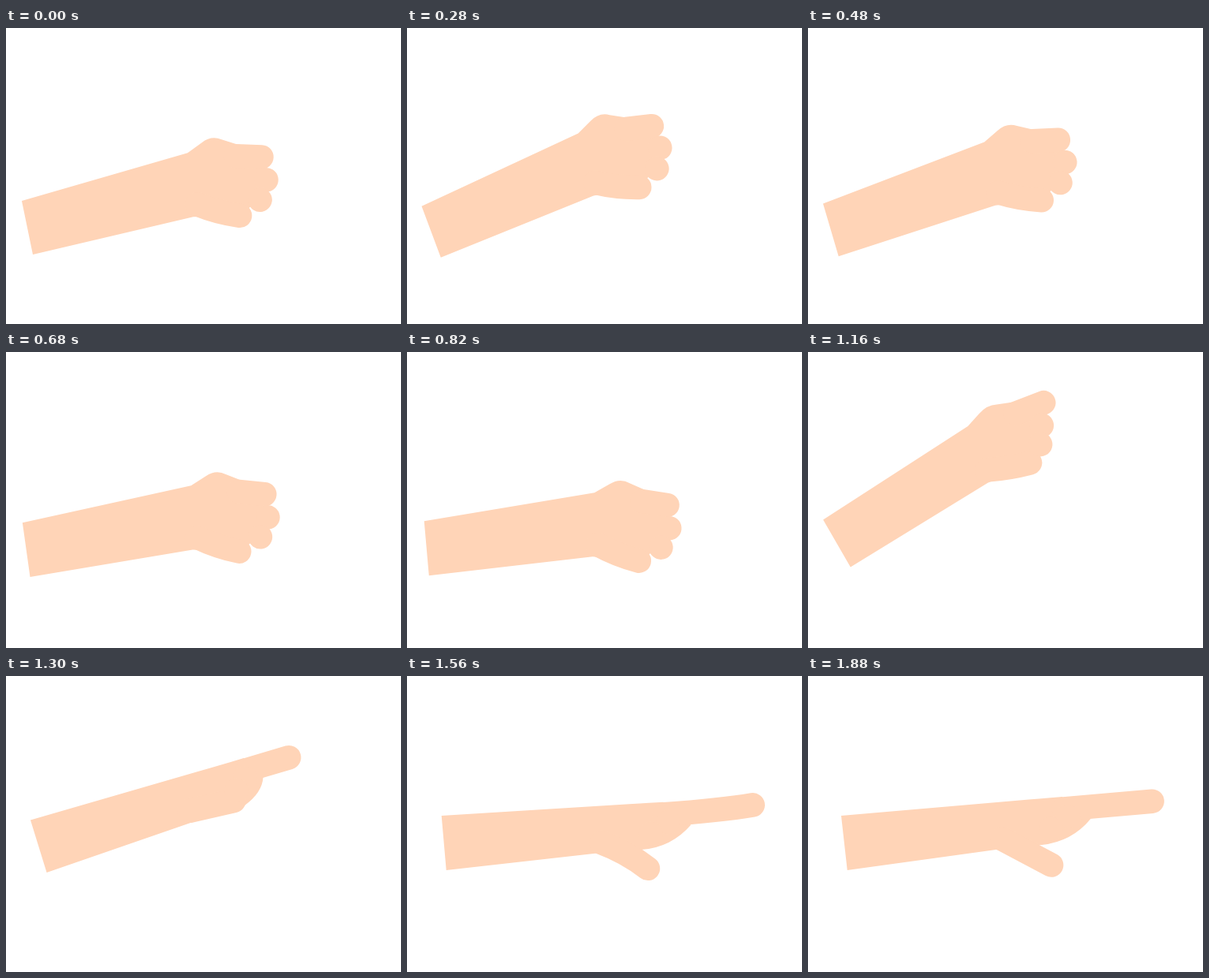
Recreate the animation shown at these times as an HTML page. Size 500 by 375 pixels, loop 8000 ms.

```html
<!DOCTYPE html>
<html lang="en">
<head>
<meta charset="utf-8">
<title>Hand</title>
<style>
  html, body { margin: 0; width: 100%; height: 100%; overflow: hidden; background: #fff; }
  svg { display: block; width: 100vw; height: 100vh; }
  .limb { fill: none; stroke: #ffd4b7; stroke-width: 30.6; stroke-linecap: round; }
</style>
</head>
<body>
<svg viewBox="0 0 500 375">
  <g id="arm">
    <path id="body" fill="#ffd4b7"/>
    <path id="index" class="limb"/>
    <path id="thumb" class="limb"/>
    <path id="middle" class="limb"/>
    <path id="ring" class="limb"/>
  </g>
</svg>
<script>
const LOOP = 8000;
const PIVOT = [39, 21];
const el = id => document.getElementById(id);

// Joint positions in arm space: the elbow's upper corner is the origin.
const fist = {
  wrist: [217.9, -17], bump1: [238.1, -26.2], bumpTop: [251.8, -33], bump2: [263.4, -25], notch: [280.8, -15.3],
  index0: [276.8, -0.9], indexMid: [292.6, 3], index1: [308.4, 6.9],
  palm0: [306.7, 7.8], palmMid: [313.7, 53.2], palm1: [266.6, 74.1], heel: [208.5, 63.7],
  thumb0: [216.6, 49], thumbMid: [239.9, 64.6], thumb1: [266.6, 74.1],
  middle: [308.5, 36.3], ring: [295.6, 59.6]
};
const half = {
  wrist: [218, 3.8], bump1: [238, 4.2], bumpTop: [252, 4.4], bump2: [263, 4.6], notch: [281, 4.9],
  index0: [281, 20.4], indexMid: [308, 20.7], index1: [335.5, 21],
  palm0: [297.4, 35.1], palmMid: [290.4, 53.8], palm1: [264.6, 62.4], heel: [191.8, 63.3],
  thumb0: [196, 48.3], thumbMid: [224, 50.4], thumb1: [253, 52.4],
  middle: [275, 30], ring: [260, 41]
};
const open = {
  wrist: [218, 5.7], bump1: [238, 6.2], bumpTop: [252, 6.5], bump2: [263, 6.8], notch: [281, 7.3],
  index0: [281, 22.9], indexMid: [352, 24.6], index1: [393.2, 25.7],
  palm0: [313.6, 39], palmMid: [286.5, 65.4], palm1: [248.3, 65.1], heel: [190, 64.6],
  thumb0: [198.8, 51.8], thumbMid: [228, 71.8], thumb1: [257.4, 91.8],
  middle: [285, 33], ring: [262, 46]
};
// Follow-through of the open fingers.
const bend = { indexMid: [0, -0.4], index1: [0.5, -4.9], thumbMid: [1, -5.8], thumb1: [-3, -2.4] };

// Tracks of [time, value], eased in and out between keys.
const angle = [[-245, 5], [296, 20.5], [838, 5], [1000, 35], [1030, 35], [1520, 4.5], [1640, 6.4]];
const pivotX = [[960, 62.4], [1040, 59.5], [1510, 85], [1640, 83.1]];
const pivotY = [[1020, 231.7], [1300, 191.1], [1560, 194.4], [1640, 193.5]];
const flex = [[1420, 0], [1550, 1], [1720, -0.15], [1880, 0]];

const clamp = x => Math.min(1, Math.max(0, x));
const mix = (a, b, k) => a + (b - a) * k;

function track(keys, t) {
  let value = keys[0][1];
  for (let i = 1; i < keys.length; i++) {
    const [t0, v0] = keys[i - 1], [t1, v1] = keys[i];
    if (t >= t0) value = mix(v0, v1, 0.5 - 0.5 * Math.cos(Math.PI * clamp((t - t0) / (t1 - t0))));
  }
  return value;
}

function poseAt(t) {
  const curl = clamp((t - 1060) / 240) ** 1.5;
  const reach = Math.sin(clamp((t - 1300) / 200) * Math.PI / 2);
  const sway = track(flex, t);
  const pose = {};
  for (const name in fist) {
    pose[name] = fist[name].map((v, i) =>
      mix(mix(v, half[name][i], curl), open[name][i], reach) + (bend[name] ? bend[name][i] * sway : 0));
  }
  return pose;
}

function draw(t) {
  const p = poseAt(t);
  const limb = name => `M${p[name + '0']} Q${p[name + 'Mid']} ${p[name + '1']}`;
  el('body').setAttribute('d',
    `M0 0L${p.wrist}L${p.bump1}Q${p.bumpTop} ${p.bump2}L${p.notch}L${p.index0}` +
    `L${p.palm0}Q${p.palmMid} ${p.palm1}L${p.heel}L0 69.4Z`);
  el('index').setAttribute('d', limb('index'));
  el('thumb').setAttribute('d', limb('thumb'));
  for (const name of ['middle', 'ring']) el(name).setAttribute('d', `M${p[name]}h.01`);
  el('arm').setAttribute('transform',
    `translate(${track(pivotX, t)} ${track(pivotY, t)}) rotate(${-track(angle, t)}) translate(${-PIVOT[0]} ${-PIVOT[1]})`);
}

const start = performance.now();
function tick() {
  draw((performance.now() - start) % LOOP);
  requestAnimationFrame(tick);
}
tick();
</script>
</body>
</html>
```
